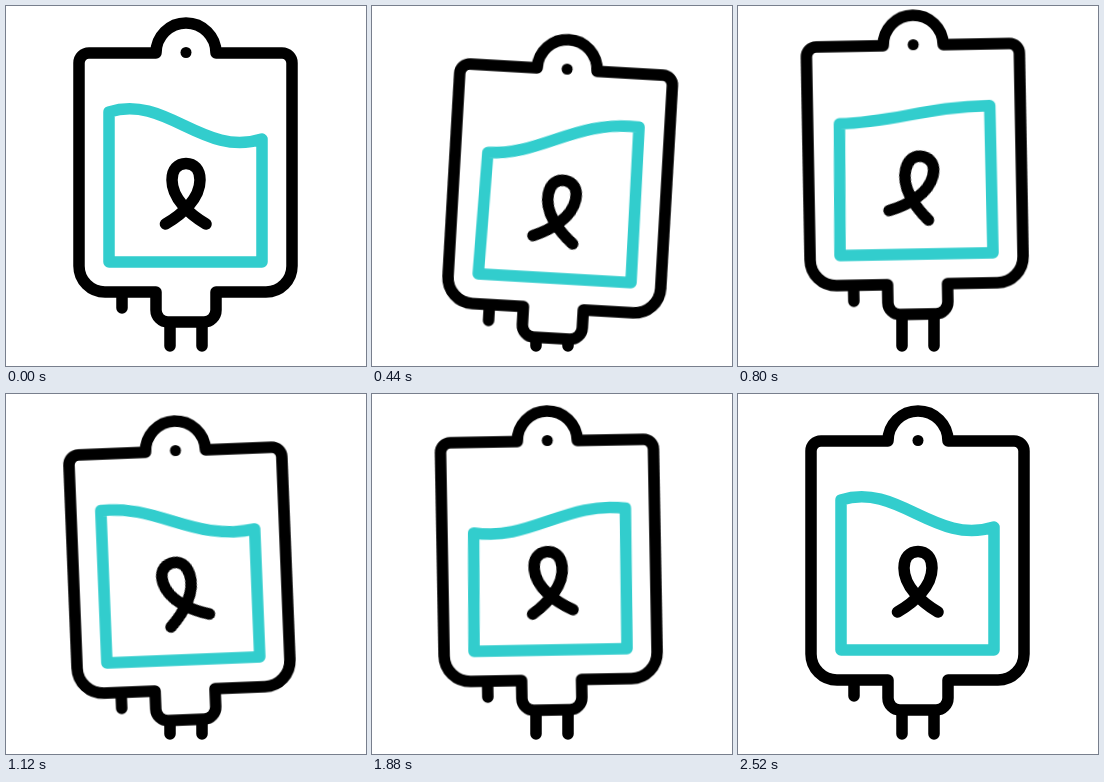
An HTML page without scripts that plays this animation: 360 by 360 pixels, repeating every 2.6 s.

```html
<!DOCTYPE html>
<html lang="en">
<head>
<meta charset="utf-8">
<title>Swinging drip bag</title>
<style>
  html, body { margin: 0; width: 100%; height: 100%; overflow: hidden; background: #fff; }
  svg { display: block; width: 100%; height: 100%; }
  path { fill: none; stroke: #000; stroke-width: 11.5; stroke-linecap: round; stroke-linejoin: round; }
  .bag { fill: #fff; }
  .liquid { stroke: #32cdcd; }

  .bob, .sway, .ribbon, .liquid {
    animation: 2600ms cubic-bezier(.333, 0, .667, 1) infinite;
  }
  .bob { animation-name: bob; }
  .sway { animation-name: sway; transform-origin: 180px 310px; }
  .ribbon { animation-name: twist; transform-origin: 180px 189px; }
  .liquid { animation-name: slosh; }

  @keyframes bob {
    0%, 55.4%, 100% { transform: translateY(0); }
    15.4% { transform: translateY(17px); }
    30% { transform: translateY(-8px); }
    43.8% { transform: translateY(10px); }
  }
  @keyframes sway {
    0%, 7.7%, 80%, 100% { transform: rotate(0deg); }
    22.7% { transform: rotate(4.9deg); }
    37.1% { transform: rotate(-5.1deg); }
    51.2% { transform: rotate(2.1deg); }
    65.4% { transform: rotate(-1.9deg); }
  }
  @keyframes twist {
    0%, 7.7%, 85.4%, 100% { transform: rotate(0deg); }
    27.7% { transform: rotate(19deg); }
    41.9% { transform: rotate(-17deg); }
    56.2% { transform: rotate(10deg); }
    70.8% { transform: rotate(-5.5deg); }
  }
  @keyframes slosh {
    0%, 96.9%, 100% { d: path("M103 106C160 88 197 152 256 133L256 256H103Z"); }
    21.5% { d: path("M106 138C160 140 190 89 255 96L256 256H103Z"); }
    43.1% { d: path("M103 103.5C160 99 195 139 256 128L256 256H103Z"); }
    64.6% { d: path("M105 143C160 157 198 100 257 112.5L256 256H103Z"); }
  }
</style>
</head>
<body>
<svg viewBox="0 0 360 360">
  <path d="M164 300V340M196 300V340"/>
  <g class="bob">
    <g class="sway">
      <path d="M116 286V302"/>
      <path class="bag" d="M83 47H150A30 30 0 0 1 210 47H276A10 10 0 0 1 286 57V260A26 26 0 0 1 260 286H210V304A12 12 0 0 1 198 316H162A12 12 0 0 1 150 304V286H99A26 26 0 0 1 73 260V57A10 10 0 0 1 83 47Z"/>
      <circle cx="180" cy="46.5" r="5.5"/>
      <path class="liquid" d="M103 106C160 88 197 152 256 133L256 256H103Z"/>
      <path class="ribbon" d="M159.5 218C177 208 194 192 194 174C194 163 188 157.5 180 157.5C172 157.5 166 163 166 174C166 192 183 208 200 218"/>
    </g>
  </g>
</svg>
</body>
</html>
```
